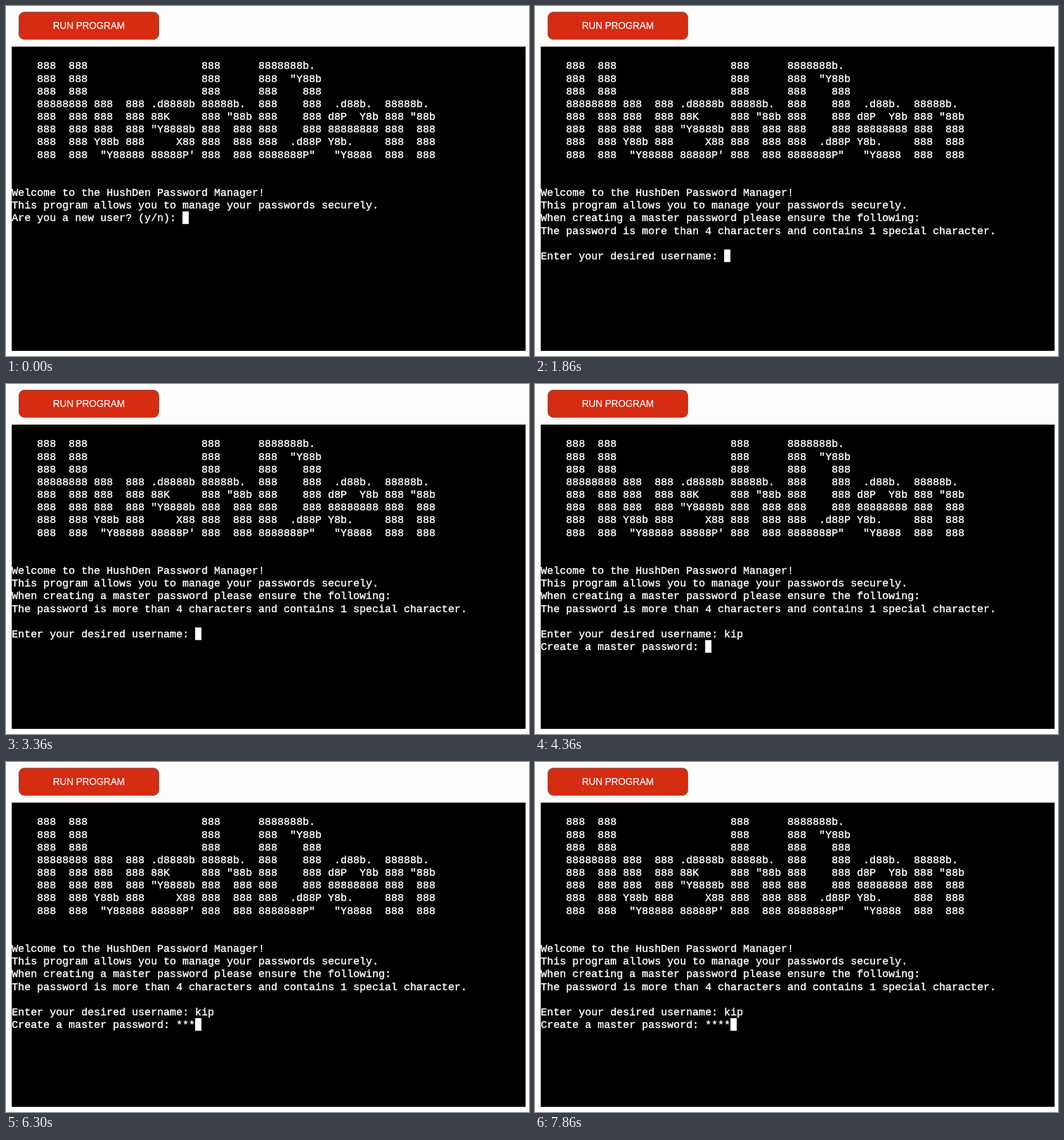
Write an HTML page that moves like this. It is 915 px wide and 612 px high and loops after 8000 ms.

```html
<!DOCTYPE html>
<html lang="en">
<head>
<meta charset="utf-8">
<title>Terminal session</title>
<style>
  html, body { margin: 0; width: 100%; height: 100%; overflow: hidden; background: #fdfdfc; }
  .run {
    position: absolute; left: 22px; top: 10px; width: 246px; height: 49px;
    box-sizing: border-box; border: 1px solid #75706e; border-radius: 10px;
    background: #d52c12; color: #fff; text-align: center;
    font: 16.5px/47px "Liberation Sans", Arial, sans-serif;
    -webkit-text-stroke: .25px #fff;
  }
  .terminal {
    --row: 22.17px;
    position: absolute; left: 10px; top: 71px; width: 899px; height: 532px;
    overflow: hidden; background: #000; color: #fff;
    font: 18.46px/var(--row) "Liberation Mono", "Courier New", monospace;
    -webkit-text-stroke: .45px #fff;
  }
  pre { position: absolute; left: 0; top: 2.2px; margin: 0; font: inherit; }
  .cursor {
    position: absolute; top: .2px; left: 0; width: 1ch; height: var(--row); background: #fff;
    transform: translate(calc(var(--x) * 1ch), calc(var(--y) * var(--row)));
  }
</style>
</head>
<body>
<div class="run">RUN PROGRAM</div>
<div class="terminal"><pre></pre><div class="cursor"></div></div>
<script>
const LOOP = 8000;
const banner = `
    888  888                  888      8888888b.
    888  888                  888      888  "Y88b
    888  888                  888      888    888
    88888888 888  888 .d8888b 88888b.  888    888  .d88b.  88888b.
    888  888 888  888 88K     888 "88b 888    888 d8P  Y8b 888 "88b
    888  888 888  888 "Y8888b 888  888 888    888 88888888 888  888
    888  888 Y88b 888     X88 888  888 888  .d88P Y8b.     888  888
    888  888  "Y88888 88888P' 888  888 8888888P"   "Y8888  888  888


Welcome to the HushDen Password Manager!
This program allows you to manage your passwords securely.
`;
const newUser = "Are you a new user? (y/n): ";
const username = `When creating a master password please ensure the following:
The password is more than 4 characters and contains 1 special character.

Enter your desired username: `;
const password = username + "kip\nCreate a master password: ";

// [start in ms, prompt, typed answer]
const steps = [
  [0, newUser, ""], [860, newUser, "y"],
  [1760, username, ""], [3560, username, "k"], [3700, username, "ki"], [3860, username, "kip"],
  [4300, password, ""], [5300, password, "*"], [5660, password, "**"],
  [6100, password, "***"], [6500, password, "****"],
];

const screen = document.querySelector("pre");
const cursor = document.querySelector(".cursor");
let shown;

function draw(now) {
  const time = now % LOOP;
  const step = steps.findLast(([start]) => start <= time);
  if (step !== shown) {
    shown = step;
    const text = banner + step[1] + step[2];
    const lines = text.split("\n");
    screen.textContent = text;
    cursor.style.setProperty("--x", lines.at(-1).length);
    cursor.style.setProperty("--y", lines.length - 1);
  }
  requestAnimationFrame(draw);
}
draw(0);
</script>
</body>
</html>
```
